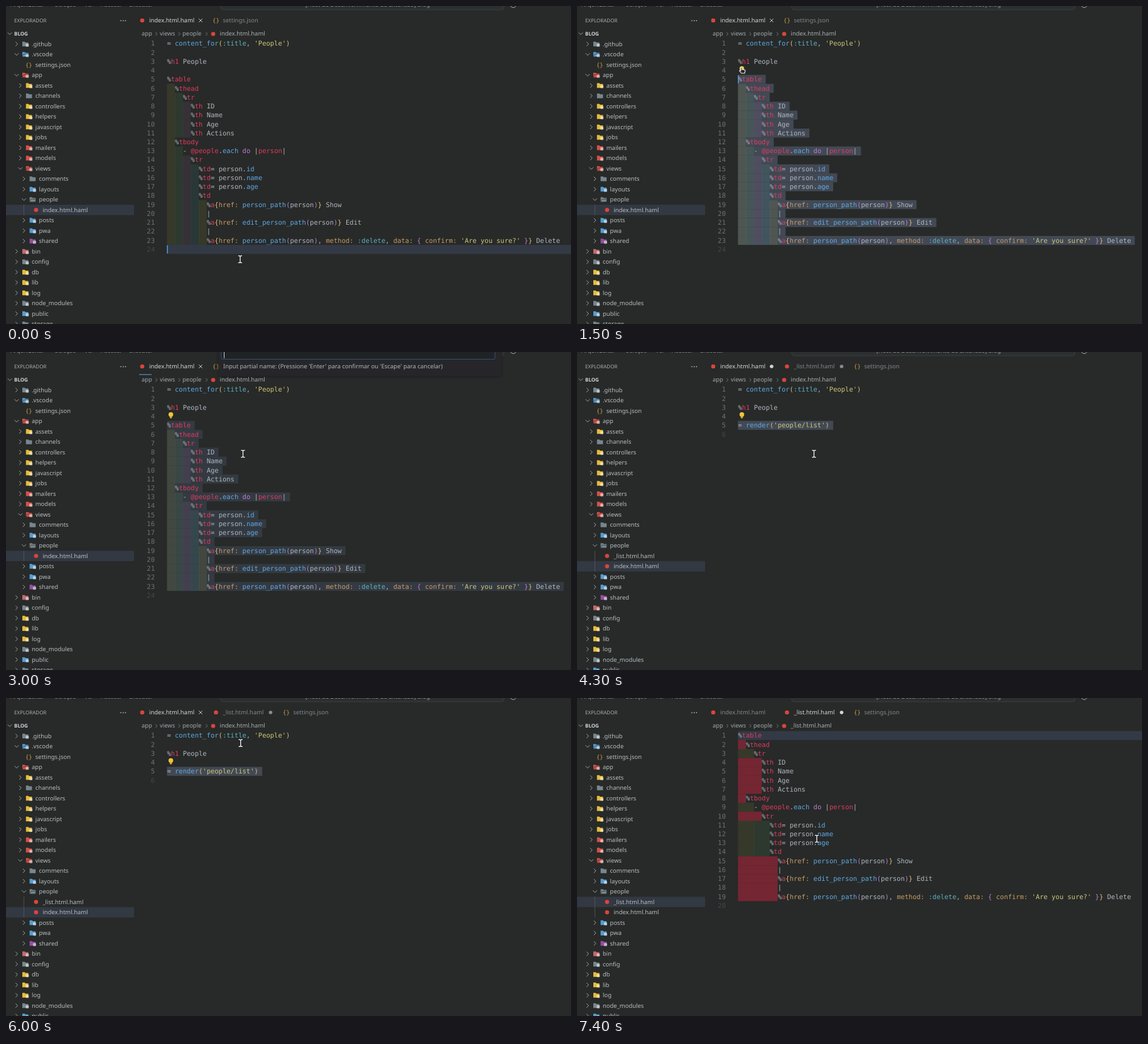
Recreate the animation shown at these times as an HTML page. Size 900x506 px, loop 7500 ms.

```html
<!DOCTYPE html>
<html lang="pt-BR">
<head>
<meta charset="utf-8">
<title>Extract a partial</title>
<style>
html, body { margin: 0; width: 100%; height: 100%; overflow: hidden; background: #272a28; }
svg { display: block; width: 100vw; height: 100vh; }
text { white-space: pre; text-rendering: geometricPrecision; font: 9.45px "Noto Sans", "Open Sans", sans-serif; }
text.code { font: 10.5px "DejaVu Sans Mono", "Liberation Mono", monospace; }
</style>
</head>
<body>
<svg id="stage" viewBox="0 0 900 506" preserveAspectRatio="none"></svg>
<script>
const LOOP = 7500, STEP = 100;
const X0 = 256.4, CW = 6.321, LH = 14.24, ROW = 16.5;
const C = {
  bg: '#272a28', text: '#b0b6bf', ui: '#b8bcbf', bright: '#d2d5d8', dim: '#81868a',
  pink: '#e03a60', blue: '#61a8e4', cyan: '#5fb0c4', orange: '#cb9a66', string: '#d0c67a',
  purple: '#c07ad6', gold: '#dfbd78', number: '#6c7276', faint: '#434749',
  line: '#333a46', sel: '#424954', selIdle: '#343a41', row: '#333943', badIndent: '#742632',
  red: '#d2514b', yellow: '#e6bb3c', slate: '#78868e', sky: '#5a9ccf', violet: '#93509f', rose: '#c06a70'
};
const RAINBOW = ['rgba(255,255,64,.07)', 'rgba(127,255,127,.07)', 'rgba(255,127,255,.07)', 'rgba(79,236,236,.07)'];

const esc = s => s.replace(/&/g, '&amp;').replace(/</g, '&lt;');
const lineY = n => 59.75 + LH * (n - 1);
const rect = (x, y, w, h, fill, extra = '') =>
  `<rect x="${x}" y="${y}" width="${w}" height="${h}" fill="${fill}" ${extra}/>`;
const dot = (x, y, r, fill) => `<circle cx="${x}" cy="${y}" r="${r}" fill="${fill}"/>`;
const stroke = (d, color, w = 1) =>
  `<path d="${d}" fill="none" stroke="${color}" stroke-width="${w}" stroke-linecap="round" stroke-linejoin="round"/>`;
const label = (x, y, s, fill = C.ui, extra = '') =>
  `<text x="${x}" y="${y + 3.4}" fill="${fill}" ${extra}>${esc(s)}</text>`;
const group = (id, body) => `<g id="${id}">${body}</g>`;

// ---- editor text ----
const TABLE = `%table
  %thead
    %tr
      %th ID
      %th Name
      %th Age
      %th Actions
  %tbody
    - @people.each do |person|
      %tr
        %td= person.id
        %td= person.name
        %td= person.age
        %td
          %a{href: person_path(person)} Show
          |
          %a{href: edit_person_path(person)} Edit
          |
          %a{href: person_path(person), method: :delete, data: { confirm: 'Are you sure?' }} Delete`.split('\n');
const HEAD = ["= content_for(:title, 'People')", '', '%h1 People', ''];
const FULL = [...HEAD, ...TABLE, ''];
const SHORT = [...HEAD, "= render('people/list')", ''];
const PARTIAL = [...TABLE, ''];

const RULES = [
  [/^(%)(\w+)/, C.text, C.pink],
  [/^('[^']*')/, C.string],
  [/^(@\w+)/, C.pink],
  [/^(\w+:)(?= )/, C.orange],
  [/^(:\w+)/, C.cyan],
  [/^(do)\b/, C.purple],
  [/^(\w+)(?=\()/, C.blue],
  [/^(\.)(\w+)/, C.text, C.blue],
  [/^(\|)(\w+)(\|)/, C.text, C.pink, C.text],
  [/^(\w+)/, C.text]
];

function highlight(line) {
  let out = '', depth = 0;
  const put = (s, color) => { out += `<tspan fill="${color}">${esc(s)}</tspan>`; };
  while (line) {
    const rule = RULES.find(r => r[0].test(line));
    let size = 1;
    if (rule) {
      const m = line.match(rule[0]);
      m.slice(1).forEach((s, i) => put(s, rule[i + 1]));
      size = m[0].length;
    } else {
      const ch = line[0];
      if ('})'.includes(ch)) depth--;
      put(ch, '{}()'.includes(ch) ? (depth ? C.purple : C.gold) : C.text);
      if ('{('.includes(ch)) depth++;
    }
    line = line.slice(size);
  }
  return out;
}

// Indents that do not fit the tab size are marked red.
function indentBars(line, n, tab) {
  const indent = line.search(/\S|$/), top = lineY(n) - LH / 2;
  if (indent % tab) return rect(X0, top, indent * CW, LH + .1, C.badIndent);
  let out = '';
  for (let i = 0; i < indent / tab; i++) {
    const x = X0 + i * tab * CW;
    out += rect(x, top, tab * CW, LH, RAINBOW[i % 4]);
    if (i) out += rect(x, top, .7, LH, 'rgba(255,255,255,.06)');
  }
  return out;
}

const code = (lines, tab) => lines.map((line, i) => {
  const n = i + 1, y = lineY(n) + 3.6;
  const numColor = n === lines.length ? C.faint : C.number;
  return indentBars(line, n, tab) +
    `<text class="code" x="237" y="${y}" text-anchor="end" fill="${numColor}">${n}</text>` +
    `<text class="code" x="${X0}" y="${y}">${highlight(line)}</text>`;
}).join('');

const selection = (line, n) =>
  `<rect data-line="${n}" x="${X0}" y="${lineY(n) - LH / 2}" width="${(line.length + 1) * CW}" height="${LH}"/>`;
const lineBand = n => rect(X0, lineY(n) - LH / 2, 900 - X0, LH, C.line);

// ---- file tree ----
const TREE = [
  [0, '.github', 'slate'], [0, '.vscode', 'sky', 1], [1, 'settings.json', '{}'], [0, 'app', 'red', 1],
  [1, 'assets', 'yellow'], [1, 'channels', 'slate'], [1, 'controllers', 'yellow'], [1, 'helpers', 'yellow'],
  [1, 'javascript', 'yellow'], [1, 'jobs', 'yellow'], [1, 'mailers', 'red'], [1, 'models', 'red'],
  [1, 'views', 'red', 1], [2, 'comments', 'slate'], [2, 'layouts', 'sky'], [2, 'people', 'slate', 1],
  [3, 'index.html.haml', 'haml'], [2, 'posts', 'sky'], [2, 'pwa', 'sky'], [2, 'shared', 'violet'],
  [0, 'bin', 'rose'], [0, 'config', 'slate'], [0, 'db', 'yellow'], [0, 'lib', 'yellow'], [0, 'log', 'yellow'],
  [0, 'node_modules', 'slate'], [0, 'public', 'sky'], [0, 'storage', 'slate']
];
const LONG_TREE = [...TREE.slice(0, 16), [3, '_list.html.haml', 'haml'], ...TREE.slice(16)];
const PLAIN = ['channels', 'comments', 'people', 'storage'];

const chevron = (x, y, open) => stroke(open
  ? `M${x - 3} ${y - 1.5}l3 3l3 -3` : `M${x - 1.5} ${y - 3}l3 3l-3 3`, '#a9aeb1', .9);

function folder(x, y, color, open, plain) {
  const body = `<path d="M${x - 5} ${y + 3.8}v-7.6h3.8l1.2 1.3h4.6v6.3z" fill="${color}"/>`;
  const flap = open ? `<path d="M${x - 5} ${y + 3.8}l2 -4.4h8.4l-1.6 4.4z" fill="${color}" stroke="${C.bg}" stroke-width=".6"/>` : '';
  return body + flap + (plain ? '' : rect(x + .4, y - .6, 5, 4.8, 'rgba(255,255,255,.55)', 'rx="1.2"'));
}

const braces = (x, y) =>
  `<text class="code" x="${x}" y="${y + 3}" text-anchor="middle" fill="#d09c4c" style="font-size:9px">{}</text>`;
const fileMark = (x, y) => dot(x, y, 3.3, '#d9453d');

function tree(rows) {
  return rows.map(([depth, name, kind, open], i) => {
    const y = 44 + ROW * (i + 1), x = 17 + depth * 5.8;
    const guide = depth === 3 ? rect(28, y - ROW / 2, .8, ROW, '#54595d') : '';
    const icon = kind === '{}' ? braces(x + 13.5, y) : kind === 'haml' ? fileMark(x + 13.5, y)
      : chevron(x, y, open) + folder(x + 14, y, C[kind], open, PLAIN.includes(name));
    return guide + icon + label(x + 24, y, name);
  }).join('');
}

// ---- tabs, breadcrumbs, popups ----
const fileTab = (x, name, active) => fileMark(x, 23) + label(x + 11, 23, name, active ? C.bright : C.dim);
const jsonTab = x => braces(x, 23) + label(x + 11, 23, 'settings.json', C.dim);

function crumbs(name) {
  const path = [[216, 'app'], [245, 'views'], [281, 'people']];
  const arrows = [239.5, 276, 319.5];
  return path.map(([x, s], i) => label(x, 44, s, '#a0a5a9') +
    stroke(`M${arrows[i] - 1} 42l2.2 2.4l-2.2 2.4`, '#888d91', .8)).join('') +
    fileMark(330, 44.5) + label(340.5, 44, name, '#a9aeb1');
}

const titleBar =
  [[7, 'Arquivo'], [35, 'Editar'], [78, 'Seleção'], [125, 'Ver'], [151, 'Acessar'], [196, 'Executar']]
    .map(([x, s]) => label(x, -2.8, s, '#8b9093')).join('') +
  rect(342, -12, 451, 18, '#2c2f2f', 'rx="4" stroke="#3e4344" stroke-width=".8"') +
  label(576, -2.8, '[Host de Desenvolvimento de Extensão] blog', '#969b9e', 'text-anchor="middle"') +
  '<circle cx="808" cy="-2" r="4.6" fill="none" stroke="#a0a5a8"/>';

const menu =
  rect(265, 128, 172.5, 44, '#24272a', 'rx="4" stroke="#373b3e" stroke-width=".8" filter="url(#shadow)"') +
  label(275, 141, 'Extrair', '#a0a5a9', 'style="font-size:8.8px"') +
  rect(268, 151, 166, 17.5, '#323944', 'rx="3"') +
  stroke('M277 164l4.3 -4.3M283.5 155.5a3 3 0 1 0 2.4 2.6l-2 1.5l-1.8 -1.8z', '#b8bcbf') +
  label(292.5, 159.5, 'Create a partial from selection', '#c6cacd');

const prompt =
  rect(338, -10, 451, 48, '#25282a', 'rx="4" filter="url(#shadow)"') +
  rect(343, -10, 436, 21.5, '#202326', 'rx="2" stroke="#38506e" stroke-width="1"') +
  label(346, 23, "Input partial name: (Pressione 'Enter' para confirmar ou 'Escape' para cancelar)", '#b0b4b8') +
  '<text id="typed" x="346.5" y="7.5" fill="#d2d5d8"></text>' +
  rect(0, -4, 1, 14, '#c9ced5', 'id="promptCaret"') +
  rect(212, 35, 20, 1.6, '#3f78b0');

const bulb = dot(262.6, 99.4, 3.7, '#f0c23c') + rect(260.9, 102.5, 3.4, 3, '#d0a630', 'rx=".8"');

const beamPath = 'M-2.6 -5.5h1.6l1 1l1 -1h1.6M0 -4.5v9M-2.6 5.5h1.6l1 -1l1 1h1.6';
const beam = stroke(beamPath, '#151716', 2.8) + stroke(beamPath, '#f2f2f2', 1.4);
const hand = '<path d="M-2 1V-4q1 -1.4 2 0v3l4 .7q1 .4 .9 1.6l-.9 3.7h-5l-3.2 -3.6q0 -1.6 2.2 -.4z" fill="#24272a" stroke="#f2f2f2" stroke-width="1.1" stroke-linejoin="round"/>';

document.getElementById('stage').innerHTML =
  '<defs><filter id="shadow" x="-10%" y="-40%" width="120%" height="180%"><feDropShadow dx="0" dy="1" stdDeviation="2.5" flood-opacity=".35"/></filter></defs>' +
  rect(0, 0, 900, 506, C.bg) + titleBar +
  label(13, 23, 'EXPLORADOR', '#a9aeb1', 'style="font-size:8px"') +
  [183, 186.7, 190.4].map(x => dot(x, 23.3, .9, C.ui)).join('') +
  chevron(6, 44, true) + label(13, 44, 'BLOG', C.bright, 'style="font-size:8px;font-weight:700"') +
  rect(0, 0, 204, ROW, C.row, 'id="treeRow"') +
  group('treeBefore', tree(TREE)) + group('treeAfter', tree(LONG_TREE)) +
  group('tabsBefore', fileTab(217, 'index.html.haml', true) + jsonTab(334.5)) +
  group('tabsIndex', fileTab(217, 'index.html.haml', true) + fileTab(334.5, '_list.html.haml', false) + dot(421.5, 23, 2.8, '#868b8f')) +
  group('tabsList', fileTab(217, 'index.html.haml', false) + fileTab(334.5, '_list.html.haml', true) + dot(421.5, 23, 2.8, C.bright)) +
  group('jsonRight', jsonTab(446.5)) +
  group('close', stroke('M307.5 20.5l5 5m0 -5l-5 5', C.bright, .9)) +
  group('dirty', dot(310, 23, 2.8, C.bright)) +
  group('crumbsIndex', crumbs('index.html.haml')) + group('crumbsList', crumbs('_list.html.haml')) +
  group('bandEnd', lineBand(24)) + group('bandTop', lineBand(1)) +
  group('selFull', FULL.slice(4, 23).map((s, i) => selection(s, i + 5)).join('')) +
  group('selShort', `<g fill="${C.sel}">${selection(SHORT[4], 5)}</g>`) +
  group('codeFull', code(FULL, 2)) + group('codeShort', code(SHORT, 2)) + group('codeList', code(PARTIAL, 4)) +
  rect(X0, 0, 1.4, 13, '#5b9cf0', 'id="caret"') +
  group('bulb', bulb) + group('menu', menu) + group('prompt', prompt) +
  group('mouse', group('beam', beam) + group('hand', hand));

// ---- animation ----
const $ = id => document.getElementById(id);
const show = (id, on) => { $(id).style.display = on ? '' : 'none'; };
const selRects = [...$('selFull').children];

const SELECT = 400, BULB = 1200, MENU = 1600, ASK = 2500, APPLY = 4300, SAVE = 5700, OPEN = 6400;
const KEYS = [3300, 3400, 3500, 3700];
const PATH = [
  [0, 373, 403], [300, 250, 388], [400, 250, 388], [800, 250, 117], [1000, 250, 117],
  [1300, 263, 102], [1600, 263, 102], [2000, 320, 160], [2400, 320, 160], [2900, 377.5, 162],
  [4400, 377.5, 162], [5100, 364, 158], [5700, 364, 158], [6200, 379, 25], [6500, 379, 25],
  [7200, 382, 224], [LOOP, 382, 224]
];

function mouseAt(t) {
  const i = PATH.findIndex(p => p[0] > t);
  const [ta, xa, ya] = PATH[i - 1], [tb, xb, yb] = PATH[i];
  const u = (t - ta) / (tb - ta), e = u * u * (3 - 2 * u);
  return [xa + (xb - xa) * e, ya + (yb - ya) * e];
}

function draw(t) {
  const [mx, my] = mouseAt(t);
  const applied = t >= APPLY, inList = t >= OPEN, asking = t >= ASK && t < APPLY;
  const selecting = t >= SELECT && !applied;
  const dragging = t < 900;
  const from = dragging ? Math.max(5, Math.round((my - lineY(1)) / LH) + 1) : 5;

  show('treeBefore', !applied);
  show('treeAfter', applied);
  $('treeRow').setAttribute('y', 44 + ROW * (applied && !inList ? 18 : 17) - ROW / 2);
  show('tabsBefore', !applied);
  show('tabsIndex', applied && !inList);
  show('tabsList', inList);
  show('jsonRight', applied);
  show('dirty', applied && t < SAVE);
  show('close', !applied || (t >= SAVE && !inList));
  show('crumbsIndex', !inList);
  show('crumbsList', inList);

  show('codeFull', !applied);
  show('codeShort', applied && !inList);
  show('codeList', inList);
  show('bandEnd', !selecting && !applied);
  show('bandTop', inList);
  show('selFull', selecting);
  show('selShort', applied && !inList);
  $('selFull').setAttribute('fill', t < MENU ? C.sel : C.selIdle);
  selRects.forEach(r => { r.style.display = +r.dataset.line >= from ? '' : 'none'; });

  const caretLine = inList ? 1 : selecting ? from : 24;
  const caretOn = inList ? (t - OPEN) % 667 < 333 : t < MENU;
  $('caret').setAttribute('y', lineY(caretLine) - 6.5);
  show('caret', caretOn);

  show('bulb', t >= BULB && !inList);
  show('menu', t >= MENU && t < ASK);
  show('prompt', asking);
  if (asking) {
    $('typed').textContent = 'list'.slice(0, KEYS.filter(k => t >= k).length);
    $('promptCaret').setAttribute('x', 347 + $('typed').getComputedTextLength());
  }

  const pointing = (t >= BULB && t < ASK) || my < 34;
  $('mouse').setAttribute('transform', `translate(${mx} ${my})`);
  show('hand', pointing);
  show('beam', !pointing);
}

const start = performance.now();
function tick() {
  const t = (performance.now() - start) % LOOP;
  draw(Math.floor(t / STEP) * STEP);
  requestAnimationFrame(tick);
}
tick();
</script>
</body>
</html>
```
